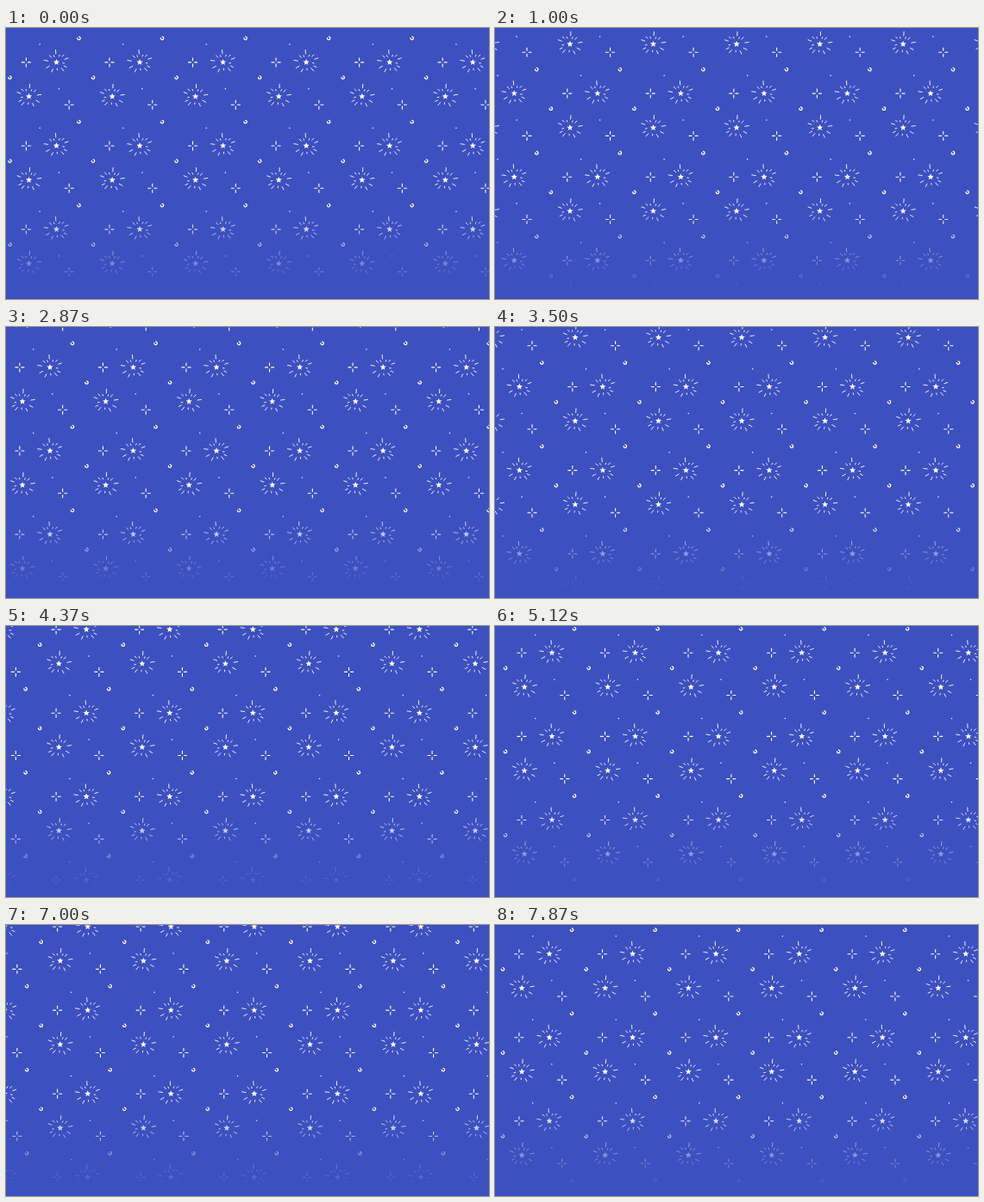
These frames come from a looping animation (560 by 315 pixels, 8 s). An HTML page:

```html
<!DOCTYPE html>
<html lang="en">
<head>
<meta charset="utf-8">
<title>Drifting stars</title>
<style>
  html, body { margin: 0; width: 100%; height: 100%; overflow: hidden; background: #3c50c0; }
  svg { display: block; width: 560px; height: 315px; }
</style>
</head>
<body>
<svg viewBox="0 0 560 315">
  <defs>
    <linearGradient id="fade" x1="0" y1="208" x2="0" y2="306" gradientUnits="userSpaceOnUse">
      <stop offset="0" stop-color="#3c50c0" stop-opacity="0"/>
      <stop offset="1" stop-color="#3c50c0"/>
    </linearGradient>
    <g id="burst">
      <path id="star" fill="#fff"/>
      <path id="rays" fill="none" stroke="#fff" stroke-width=".9"/>
    </g>
    <path id="plus" d="M-5.5 0H-1.6M1.6 0H5.5M0-5.5V-1.6M0 1.6V5.5" stroke="#fff" stroke-width="1.1"/>
    <path id="ring" d="M-.4-1.65A1.7 1.7 0 1 1-1.6-.6" fill="none" stroke="#fff" stroke-width="1.3"/>
    <circle id="dot" r=".75" fill="#fff"/>
    <g id="tile">
      <use href="#burst" x="58.5" y="39.8"/>
      <use href="#burst" transform="translate(26.6 79.6) scale(-1 1)"/>
      <use href="#plus" x="23.4" y="39.9"/>
      <use href="#plus" x="73.2" y="89.2"/>
      <use href="#ring" x="84.5" y="11.9"/>
      <use href="#ring" x="4.5" y="57.5"/>
      <use href="#dot" x="39.2" y="19.1"/>
      <use href="#dot" x="61.3" y="70.8"/>
    </g>
  </defs>
  <rect width="560" height="315" fill="#3c50c0"/>
  <g id="field"></g>
  <rect y="208" width="560" height="107" fill="url(#fade)"/>
</svg>
<script>
const W = 96.55, H = 97.1, LOOP = 8000, STEPS = 64;
const $ = id => document.getElementById(id);

// Clockwise angle from straight up, in degrees
const polar = (deg, r) => {
  const a = deg * Math.PI / 180;
  return (r * Math.sin(a)).toFixed(2) + ' ' + (-r * Math.cos(a)).toFixed(2);
};

$('star').setAttribute('d', 'M' + Array.from({ length: 10 },
  (_, i) => polar(i * 36, i % 2 ? 1.7 : 3.8)).join('L') + 'Z');

// Angle, inner radius, outer radius
const rays = [
  [-4, 9.5, 14.8], [24, 7, 9.5], [45, 9, 12.5], [70, 10, 14.8], [97, 7, 9.5],
  [116, 9.5, 13.5], [140, 8.5, 13.5], [174, 7, 9.5], [207, 8.5, 13], [241, 9, 14],
  [279, 9.5, 14.8], [314, 7.5, 11.5], [338, 6.5, 9]
];
$('rays').setAttribute('d', rays.map(([a, r0, r1]) =>
  `M${polar(a, r0)}L${polar(a, r1)}`).join(''));

let tiles = '';
for (let row = -1; row < 4; row++)
  for (let col = 0; col < 7; col++)
    tiles += `<use href="#tile" x="${col * W}" y="${row * H}"/>`;
$('field').innerHTML = tiles;

// Drift down-left in even steps, eight per second
const start = performance.now();
function draw() {
  const t = (performance.now() - start) % LOOP;
  const step = Math.floor((t + 5) * STEPS / LOOP) % STEPS;
  const d = 3 * W * step / STEPS;
  $('field').setAttribute('transform', `translate(${-(d % W)} ${d % H})`);
  requestAnimationFrame(draw);
}
draw();
</script>
</body>
</html>
```
